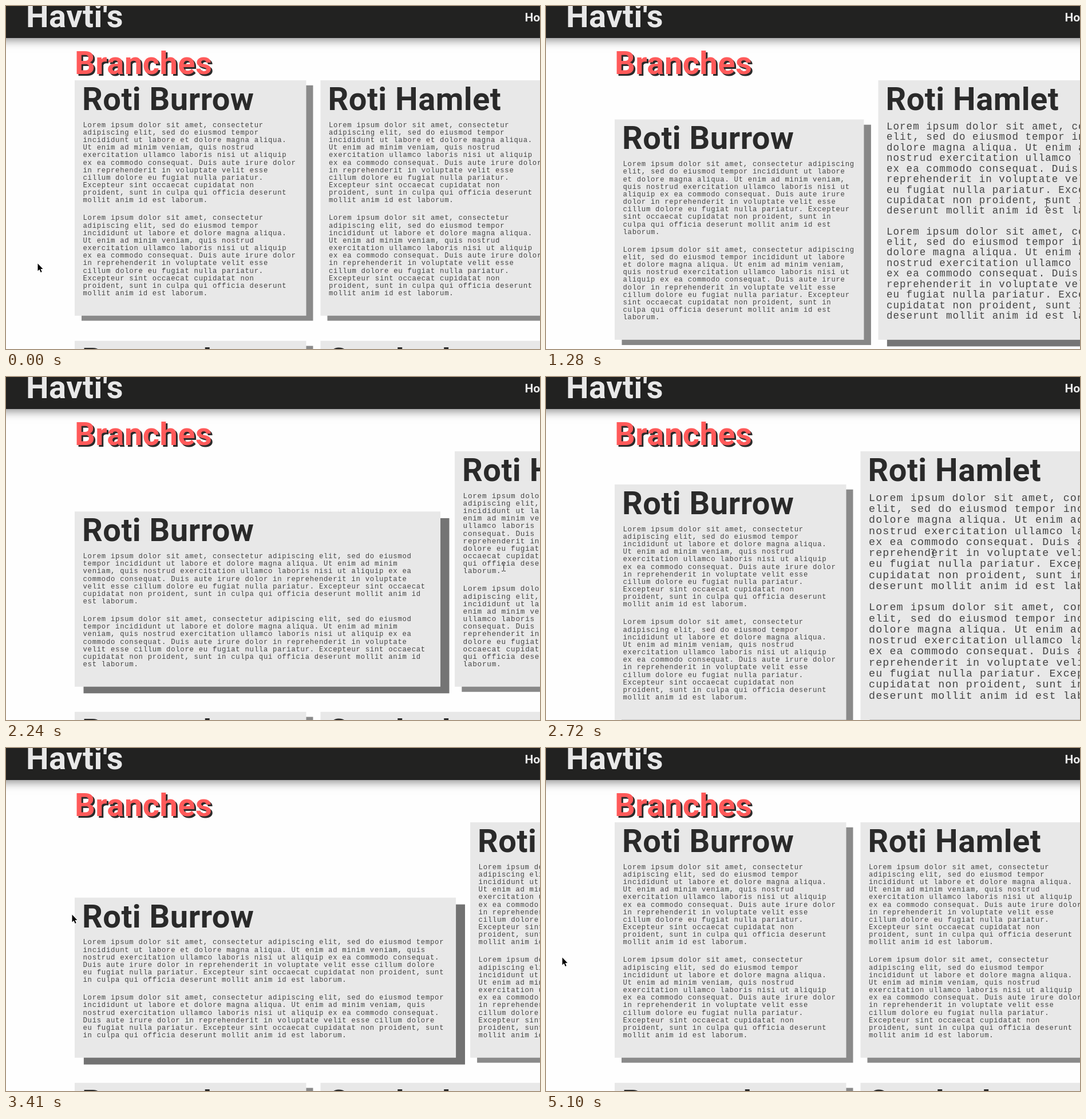
An HTML page with a canvas for the animation above (6.17 s loop, 933 by 600 pixels).

```html
<!DOCTYPE html>
<html lang="en">
<head>
<meta charset="utf-8">
<title>Branches</title>
<style>
  html, body { margin: 0; width: 100%; height: 100%; overflow: hidden; background: #fefefe; }
  canvas { display: block; }
</style>
</head>
<body>
<canvas id="stage" width="933" height="600"></canvas>
<script>
const ctx = document.getElementById('stage').getContext('2d');
const LOOP = 6170, W = 933, H = 600;
const HEAD = 'bold 56px Roboto, sans-serif';
const INK = '#2a2a2a', PAPER = '#e8e8e8';

const LOREM = ('Lorem ipsum dolor sit amet, consectetur adipiscing elit, sed do eiusmod tempor ' +
  'incididunt ut labore et dolore magna aliqua. Ut enim ad minim veniam, quis nostrud ' +
  'exercitation ullamco laboris nisi ut aliquip ex ea commodo consequat. Duis aute irure ' +
  'dolor in reprehenderit in voluptate velit esse cillum dolore eu fugiat nulla pariatur. ' +
  'Excepteur sint occaecat cupidatat non proident, sunt in culpa qui officia deserunt ' +
  'mollit anim id est laborum.').split(' ');

// Card layout
const LEFT = 120, TOP = 130, GAP = 25, ROW_GAP = 44;
const BASE_W = 404.5, GROW = 2 / 3;
const PAD = 14.5, TEXT_TOP = 71.5, PARA_GAP = 17.8, CHROME = 122;
const PITCH = 8.09, BASE_FONT = 13.333, ZOOM = 0.878;

// The pointer enters the first card, crosses the gap back and forth, then leaves
const ENTER = 630, EXIT = 3330, CROSSINGS = [1097, 1701, 2208, 2802];
const FADE = 300, HALF_GAP = 6;
const crossed = side => CROSSINGS.map((c, i) => c + side * (i % 2 ? -HALF_GAP : HALF_GAP));
const cards = [
  { title: 'Roti Burrow', hover: [ENTER, ...crossed(-1), EXIT] },
  { title: 'Roti Hamlet', hover: crossed(1) }
];

// Key points of the pointer: time, x, y
const PATH = [
  [515, 55, 450], [ENTER, 120, 428], [856, 309, 381], [1290, 900, 342],
  [1701, 536, 340], [1824, 417, 341], [1940, 388, 341], [2208, 806, 334],
  [2238, 869, 332], [2390, 922, 326], [2802, 537, 298], [3068, 484, 291],
  [EXIT, 119, 291], [3690, 18, 290], [4660, 18, 290], [4900, 28, 366]
];

const lerp = (a, b, k) => a + (b - a) * k;

// The screen refreshes in even steps
const REFRESH = 69.1, PHASE = 580;
const tick = t => PHASE + Math.floor((t - PHASE) / REFRESH) * REFRESH;

// cubic-bezier(.25, .1, .25, 1)
function ease(x) {
  if (x <= 0) return 0;
  if (x >= 1) return 1;
  let lo = 0, hi = 1;
  for (let i = 0; i < 24; i++) {
    const s = (lo + hi) / 2;
    if (0.75 * s * (1 - s) + s ** 3 < x) lo = s; else hi = s;
  }
  return 0.3 * lo * (1 - lo) ** 2 + 3 * lo * lo * (1 - lo) + lo ** 3;
}

// Width eases both ways; the type size only eases in
function hoverState(times, t) {
  const past = times.filter(h => h <= t);
  if (!past.length) return { grow: 0, type: 0 };
  const k = ease((t - past[past.length - 1]) / FADE);
  const on = past.length % 2 === 1;
  return { grow: on ? k : 1 - k, type: on ? k : 0 };
}

function pointerAt(t) {
  if (t <= PATH[0][0]) return PATH[0].slice(1);
  const i = PATH.findIndex(p => p[0] >= t);
  if (i < 0) return PATH[PATH.length - 1].slice(1);
  const a = PATH[i - 1], b = PATH[i];
  const k = (t - a[0]) / (b[0] - a[0]);
  return [lerp(a[1], b[1], k), lerp(a[2], b[2], k)];
}

function wrap(words, max) {
  const lines = [];
  let line = '';
  for (const word of words) {
    const next = line ? line + ' ' + word : word;
    if (next.length > max) {
      lines.push(line);
      line = word;
    } else line = next;
  }
  return lines.concat(line);
}

function layout(card, t) {
  const { grow, type } = hoverState(card.hover, t);
  const zoom = 1 + type / 2;
  const w = BASE_W * (1 + GROW * grow);
  const pitch = PITCH * zoom;
  const lineH = ZOOM * Math.round(1.1 * BASE_FONT * zoom);
  const lines = wrap(LOREM, (w - 2 * PAD) / pitch);
  const h = CHROME + 2 * lines.length * lineH;
  return { title: card.title, grow, w, pitch, lineH, lines, h };
}

function text(str, x, y, font, fill, spacing = 0) {
  ctx.font = font;
  ctx.letterSpacing = spacing + 'px';
  ctx.fillStyle = fill;
  ctx.fillText(str, x, y);
}

const heading = (str, x, y, fill) => text(str, x, y, HEAD, fill, 0.5);

function panel(title, x, y, w, h, grow) {
  const shade = Math.round(lerp(138, 113, grow));
  ctx.fillStyle = `rgb(${shade},${shade},${shade})`;
  ctx.fillRect(x + lerp(12, 16, grow), y + lerp(8.8, 12, grow), w, h);
  ctx.fillStyle = PAPER;
  ctx.fillRect(x, y, w, h);
  heading(title, x + 13, y + 52, INK);
}

// Returns true when the pointer is over one of the paragraphs
function drawCard(c, x, y, [px, py]) {
  panel(c.title, x, y, c.w, c.h, c.grow);
  const size = c.pitch / 0.66;
  const font = size + 'px "Liberation Mono", monospace';
  const paraH = c.lines.length * c.lineH;
  let over = false;
  for (let p = 0; p < 2; p++) {
    const top = y + TEXT_TOP + p * (paraH + PARA_GAP);
    c.lines.forEach((line, i) =>
      text(line, x + PAD, top + (i + 0.78) * c.lineH, font, '#444', size * 0.06));
    if (px > x + PAD && px < x + c.w - PAD && py > top && py < top + paraH) over = true;
  }
  return over;
}

function drawHeader() {
  ctx.save();
  ctx.shadowColor = 'rgba(0,0,0,.5)';
  ctx.shadowBlur = 16;
  ctx.shadowOffsetY = 3;
  ctx.fillStyle = '#222221';
  ctx.fillRect(-30, -30, W + 60, 86);
  ctx.restore();
  heading("Havti's", 35, 37, PAPER);
  text('Home', 906.5, 27, 'bold 21px Roboto, sans-serif', PAPER);
  heading('Branches', 123, 122, INK);
  heading('Branches', 120, 119, '#ff5a5a');
}

function drawArrow(x, y) {
  ctx.save();
  ctx.translate(Math.round(x) + 0.5, Math.round(y) + 0.5);
  const shape = new Path2D('M0 0V13L3 10.3L5.2 15.5L7.2 14.6L5 9.6L9 9.4Z');
  ctx.lineWidth = 1.5;
  ctx.strokeStyle = '#fff';
  ctx.stroke(shape);
  ctx.fillStyle = '#000';
  ctx.fill(shape);
  ctx.restore();
}

function drawBeam(x, y) {
  const cx = Math.round(x), cy = Math.round(y);
  ctx.fillStyle = '#333';
  ctx.fillRect(cx, cy - 6, 1, 13);
  for (const dy of [-7, 7]) {
    ctx.fillRect(cx - 3, cy + dy, 3, 1);
    ctx.fillRect(cx + 1, cy + dy, 3, 1);
  }
}

function draw(time) {
  const t = tick(time);
  const pointer = pointerAt(t);
  ctx.fillStyle = '#fefefe';
  ctx.fillRect(0, 0, W, H);
  drawHeader();

  // Cards in a row share their bottom edge
  const row = cards.map(c => layout(c, t));
  const tallest = Math.max(...row.map(c => c.h));
  const bottom = TOP + tallest;
  let x = LEFT, over = false;
  for (const c of row) {
    over = drawCard(c, x, bottom - c.h, pointer) || over;
    x += c.w + GAP;
  }

  ['Ranom den', 'Condar lane'].forEach((title, i) =>
    panel(title, LEFT + i * (BASE_W + GAP), bottom + ROW_GAP, BASE_W, tallest, 0));

  (over ? drawBeam : drawArrow)(...pointer);
}

const begin = performance.now();
function loop() {
  draw((performance.now() - begin) % LOOP);
  requestAnimationFrame(loop);
}
loop();
</script>
</body>
</html>
```
